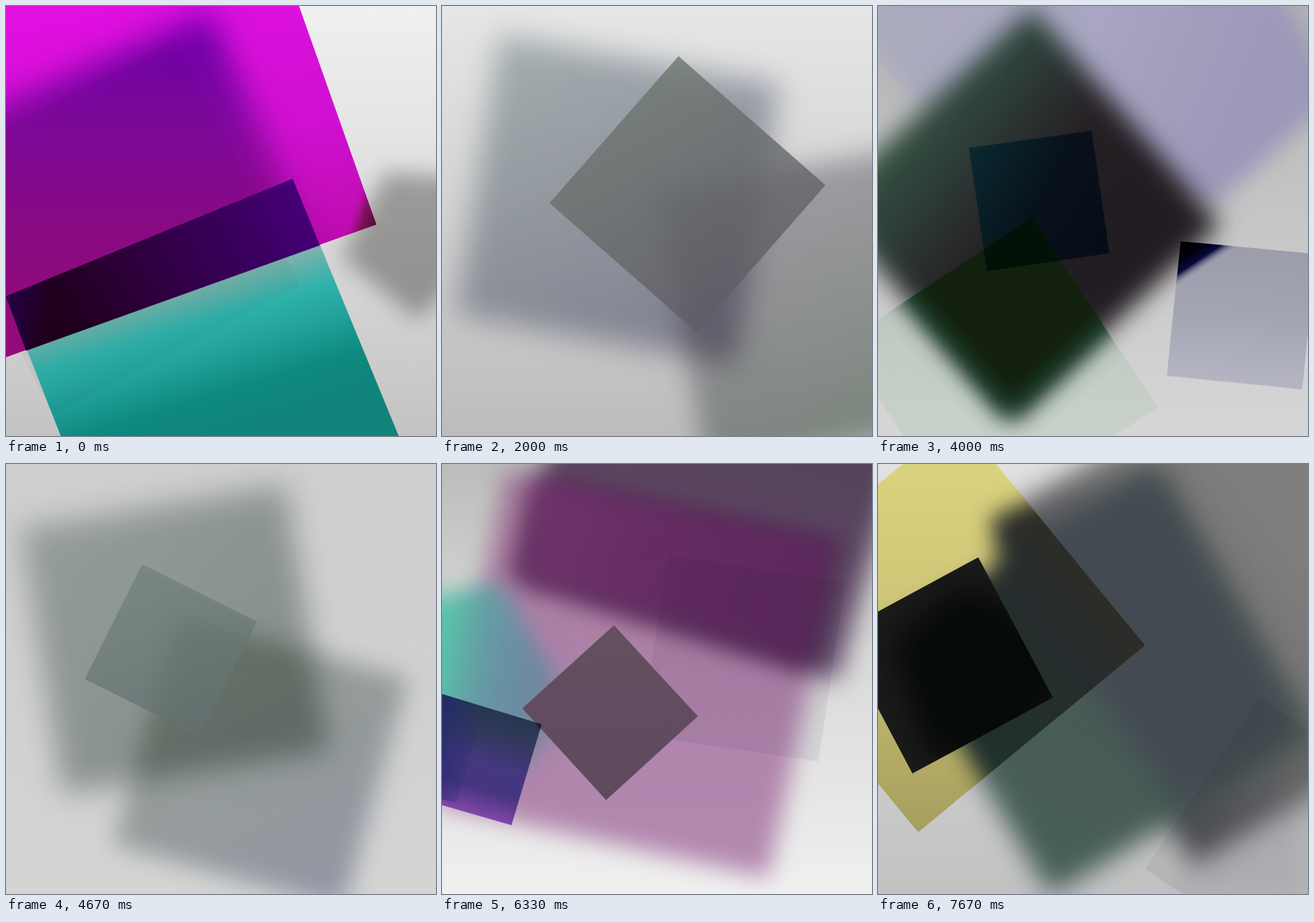
These frames come from a looping animation (600 px wide and 600 px high, 8 s). An HTML page:

```html
<!DOCTYPE html>
<html lang="en">
<head>
<meta charset="utf-8">
<title>Overlapping squares</title>
<style>
  html, body { margin: 0; width: 100%; height: 100%; overflow: hidden; background: #ddd; }
  svg { display: block; width: 100vw; height: 100vh; }
  .scene { display: none; isolation: isolate; }
  .scene.on { display: inline; }
</style>
</head>
<body>
<svg id="stage" viewBox="0 0 600 600"></svg>
<script>
let defs = '', ids = 0;

// Linear gradient between two stage points, with evenly spaced colours.
function grad(x1, y1, x2, y2, ...colors) {
  const id = 'g' + ids++;
  const stops = colors.map((c, i) =>
    `<stop offset="${i / (colors.length - 1)}" stop-color="${c}"/>`).join('');
  defs += `<linearGradient id="${id}" gradientUnits="userSpaceOnUse" x1="${x1}" y1="${y1}" x2="${x2}" y2="${y2}">${stops}</linearGradient>`;
  return `url(#${id})`;
}

function poly(points, fill, blur = 0, alpha = 1, mode = 'normal') {
  const filter = blur ? `filter:blur(${blur}px);` : '';
  return `<polygon points="${points}" fill="${fill}" style="${filter}opacity:${alpha};mix-blend-mode:${mode}"/>`;
}

const mult = (points, fill, blur = 0, alpha = 1) => poly(points, fill, blur, alpha, 'multiply');

function clip(points, ...parts) {
  const id = 'c' + ids++;
  defs += `<clipPath id="${id}"><polygon points="${points}"/></clipPath>`;
  return `<g clip-path="url(#${id})">${parts.join('')}</g>`;
}

const back = (...colors) => poly('0,0 600,0 600,600 0,600', grad(0, 0, 0, 600, ...colors));

function magenta() {
  const sheet = '409,0 517,305 0,490 -60,511 -60,-20 402,-20';
  const teal = '400,241 548,600 548,640 92,640 0,405';
  return [
    back('#f0f0f0', '#dcdcdc', '#c3c3c3'),
    mult('530,232 468,350 575,438 680,330 640,240', '#b0b0ae', 15),
    poly(teal, grad(285, 383, 345, 580, '#7db2ac', '#2fb2aa', '#20a098', '#0f8a80', '#10847a')),
    clip(sheet,
      poly(sheet, grad(150, 0, 240, 420, '#e010e0', '#d010d2', '#b80ca4')),
      poly('-90,175 285,8 385,245 440,380 0,560 -90,560',
        grad(200, 30, 200, 440, '#6e00aa', '#80089c', '#8c0a88', '#960a7c'), 22),
      poly('517,305 495,245 420,340', grad(517, 305, 478, 292, '#4c1030', '#80105c', '#c010b000'))),
    poly('400,241 438,334 28,481 0,405',
      grad(415, 265, 80, 445, '#450078', '#3a005c', '#2e003c', '#20001c')),
    poly('0,405 28,481 70,466 60,381', grad(0, 410, 65, 425, '#28005c', '#28005c00'), 0, .7),
    mult('235,45 410,390 65,570 -110,225', '#101010', 0, .035)
  ];
}

function forest() {
  const dark = '0,158 263,133 308,591 217,600 0,620';
  const leaf = '560,270 190,520 -60,150 310,-100';
  return [
    back('#e4e4e4', '#d0d0d0', '#b4b4b4'),
    mult(leaf, grad(220, 0, 300, 370, '#adcbb9', '#c2dccb', '#e0f4e4', '#eefcea'), 20),
    mult('452,285 470,700 20,720 0,310', grad(290, 400, 440, 420, '#efefb2', '#e9e97c'), 16),
    poly('475,0 450,31 584,140 600,120 600,0', grad(0, 0, 0, 140, '#d0bad6', '#c4a0b0')),
    clip(dark,
      poly(dark, grad(0, 260, 70, 600, '#747c84', '#6d7355', '#66681c', '#5a5a06')),
      poly('308,430 330,620 190,620 200,510', grad(0, 480, 0, 600, '#525400', '#4a4800'), 18),
      poly('-60,150 -60,60 330,60 330,440 190,535',
        grad(100, 140, 140, 510, '#1c4238', '#14593f', '#34683c', '#427410', '#406f00', '#3d6500'), 18),
      poly('-30,120 110,120 0,200 -30,200', '#20352c', 16, .8),
      poly('-30,400 15,480 20,640 -30,640', '#44442c', 15, .6))
  ];
}

function dusk() {
  const tile = '330,70 535,250 355,455 150,275';
  return [
    back('#e6e6e6', '#d2d2d2', '#bcbcbc'),
    mult('80,40 470,110 410,500 20,430', grad(60, 60, 430, 460, '#b8c4c4', '#a6a4ba'), 20),
    mult('300,260 690,190 750,570 370,650', grad(300, 230, 620, 600, '#c6baca', '#a6b4a8'), 18),
    poly(tile, grad(240, 100, 440, 430, '#6d7770', '#5e5b64'), 0, .8)
  ];
}

function ash() {
  return [
    back('#ececec', '#cfcfd0', '#b5b5b6'),
    mult('470,0 600,57 600,600 362,600 47,450 260,0',
      grad(250, 0, 330, 600, '#999c9c', '#a3a5a4', '#a4a4a4', '#bababa')),
    mult('95,0 -12,228 412,424 612,0', '#e9ebe2'),
    mult('185,382 567,0 200,-370 -195,0',
      grad(50, 240, 330, -10, '#7e9070', '#7c8868', '#70605a', '#4c2a28', '#38120f', '#30100c'), 17),
    poly('470,-4 380,160 200,300 250,80', '#1c0a08', 32, .65),
    poly('-40,-40 80,-40 20,130 -40,150', '#a0b4b0', 28, .5),
    mult('90,380 350,400 315,560 60,540', '#303034', 20, .08)
  ];
}

function night() {
  const gem = '215,3 477,305 185,578 -77,275';
  const pale = '215,295 390,560 125,735 -50,470';
  const blue = '127,198 298,174 323,345 152,370';
  const card = '422,328 611,346 592,535 403,516';
  return [
    back('#b4b4b4', '#c6c6c6', '#d6d6d6'),
    poly('550,-40 645,120 470,278 200,250 50,130 -25,40 10,-40',
      grad(50, 20, 500, 200, '#aaaabe', '#a8a6c2', '#9c98b8'), 15),
    mult(pale, '#eefaf2'),
    poly(gem, grad(50, 130, 300, 330, '#365444', '#2c3a36', '#261f24', '#221d22'), 17),
    clip(pale,
      poly(gem, '#1c5038', 17),
      poly('215,20 462,305 185,560 -60,275', '#13200e', 14)),
    poly(blue, grad(130, 220, 310, 320, '#0a272e', '#08121c', '#070d18')),
    clip(blue, poly(pale, '#031207')),
    poly(card, grad(515, 335, 498, 530, '#9b9dab', '#a4a5b2', '#b5b5c3')),
    poly('422,328 500,335.5 416,390', grad(426, 332, 451, 370, '#000004', '#00000c', '#08083c', '#9c9eac00'))
  ];
}

function haze() {
  return [
    back('#cecece', '#d0d0d0', '#d4d4d4'),
    mult('20,90 390,30 450,400 80,460', grad(60, 60, 410, 430, '#b8c2be', '#a0aaa6'), 20),
    mult('240,210 560,300 470,620 150,530', grad(260, 220, 460, 600, '#bac6b4', '#b0b4c4'), 17),
    poly('190,140 350,220 270,380 110,300', grad(190, 140, 260, 380, '#71817b', '#636f70'), 0, .75)
  ];
}

function moss() {
  const pane = '228,0 600,0 600,340 264,373';
  const leaf = '90,62 477,133 402,545 20,470';
  const fog = '-60,212 367,165 402,660 -60,660';
  return [
    back('#cbcac8', '#d6d6d6', '#d2d2d2', '#d2d2d2'),
    poly('-40,-40 60,-40 0,60 -40,60', '#bfbfbd', 25, .6),
    mult(leaf, '#e8fbd4', 15),
    poly(fog, grad(180, 180, 110, 600, '#858782', '#8b8f8b', '#8b9592', '#7a8785', '#8993a0', '#a9b5c9'), 18),
    poly('120,450 370,370 380,490 300,500', '#6c7b79', 22, .7),
    poly('-40,250 10,260 10,360 -40,380', '#787e8c', 18, .6),
    clip(pane,
      poly(pane, grad(240, 40, 580, 250, '#bcc1ae', '#b5bcb4', '#babec3', '#c0c4c5')),
      poly(leaf, grad(250, 130, 460, 220, '#a6ce78', '#98c480', '#90bc88', '#9cc294'), 16),
      poly(fog, grad(300, 175, 320, 370, '#38601c', '#335818', '#456c30', '#3c6024'), 15),
      poly('335,190 362,190 362,250 335,260', '#28481e', 14, .7)),
    mult('0,123 90,179 38,270 0,250', grad(20, 130, 40, 260, '#e6e2de', '#dcd8d2'))
  ];
}

function plum() {
  return [
    back('#bbbdba', '#d4d5d3', '#e2e2e2', '#f0f0f0'),
    mult('90,8 555,108 455,577 -10,475', grad(240, 50, 200, 530, '#d498c8', '#cc98c6', '#c294be'), 16),
    mult('160,-60 98,160 552,303 650,-60', grad(150, 100, 580, 150, '#7c5e84', '#72587c'), 17),
    poly('130,18 548,108 508,280 108,160', grad(120, 60, 520, 220, '#743470', '#682c66', '#602860'), 16, .85),
    poly('-60,195 80,165 185,335 100,440 -60,420',
      grad(0, 260, 180, 290, '#58c4aa', '#64a0a4', '#6890a4', '#7088a0', '#84809e'), 15),
    mult('315,127 563,165 525,415 277,378', '#303058', 0, .07),
    poly('240,225 357,352 229,469 112,341', grad(220, 230, 235, 465, '#65505f', '#614c60', '#5e4a5e')),
    poly('0,321 139,363 97,504 0,476',
      grad(70, 342, 28, 484, '#24384e', '#34385e', '#44387e', '#463680', '#8046a8')),
    poly('0,321 60,339 20,473 0,468', grad(0, 400, 55, 410, '#22286c', '#22286c00'), 0, .6),
    poly('130,361 139,363 137,371', '#281828')
  ];
}

function citrus() {
  const sun = '373,253 56,514 -205,197 112,-64';
  const ink = '140,130 244,326 48,432 -56,236';
  return [
    back('#e2e0e1', '#d2d2d2', '#c2c2c3'),
    poly('600,450 600,600 390,600', '#b0b0ba', 20, .7),
    poly('158,78 440,562 920,280 640,-200', grad(300, 330, 580, 120, '#515157', '#626266', '#767574', '#807d7d'), 18),
    poly('240,602 612,380 390,8 20,230', grad(500, 150, 240, 560, '#4c5a54', '#465e57'), 18),
    poly('168,132 385,5 585,365 425,485', '#434a52', 20),
    mult('533,325 600,372 600,600 425,600 373,565', '#202024', 0, .07),
    clip(sun,
      poly(sun, grad(60, 0, 60, 510, '#dad27e', '#d0c878', '#bcb46a', '#a69e5e')),
      poly('158,75 420,-40 600,300 240,602 20,230 168,140',
        grad(130, 360, 320, 210, '#20302c', '#23302d', '#262c2d', '#2c2d29'), 15)),
    clip(ink,
      poly(ink, '#1b1b1a'),
      poly('120,165 300,260 180,420 70,410 20,250', '#050907', 24))
  ];
}

const scenes = [magenta, forest, dusk, ash, night, haze, moss, plum, citrus];
const stage = document.getElementById('stage');
const body = scenes.map(s => `<g class="scene">${s().join('')}</g>`).join('');
stage.innerHTML = `<defs>${defs}</defs>${body}`;
const groups = [...stage.querySelectorAll('.scene')];

// The first picture is cut short; every later one holds for a second.
function tick() {
  const t = performance.now() % 8000;
  const now = Math.floor((t + 670) / 1000);
  groups.forEach((g, i) => g.classList.toggle('on', i === now));
  requestAnimationFrame(tick);
}
tick();
</script>
</body>
</html>
```
